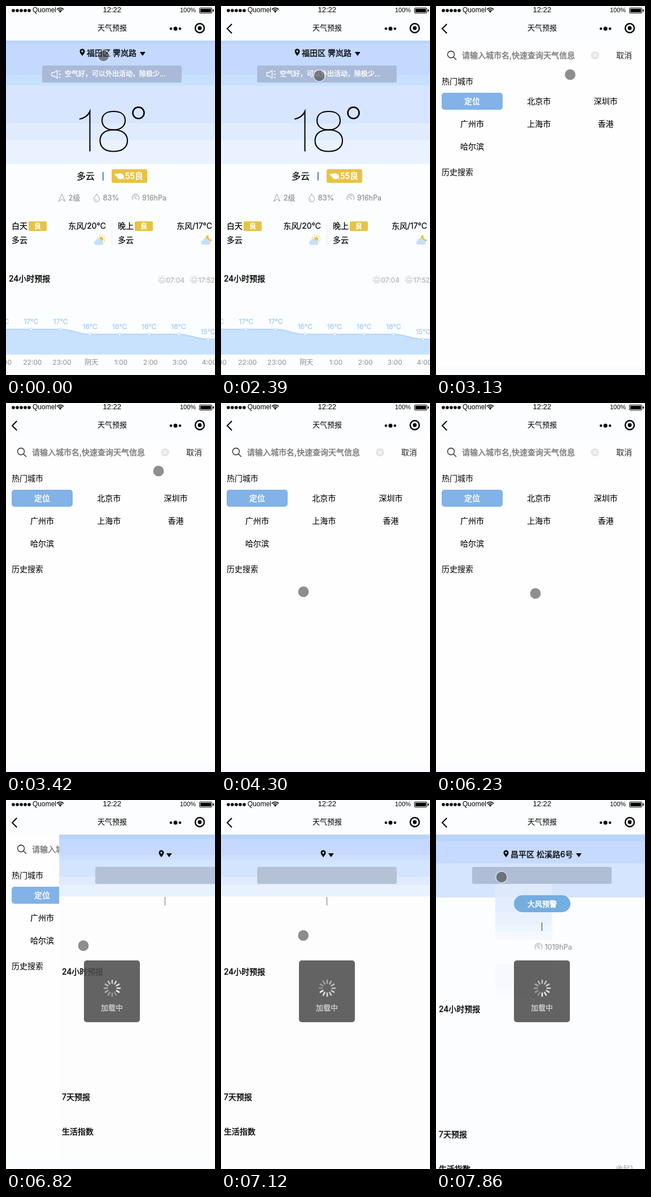
Animation of 370 by 651 pixels, one loop 8 s. Source, as an HTML page with a canvas:

```html
<!DOCTYPE html>
<html lang="zh-CN">
<head>
<meta charset="utf-8">
<title>天气预报</title>
<style>
html, body { margin: 0; width: 100%; height: 100%; overflow: hidden; background: #fcfdff; }
canvas { display: block; width: 370px; height: 651px; }
</style>
</head>
<body>
<canvas id="stage"></canvas>
<script>
const W = 370, H = 651, LOOP = 8000, TOP = 61;
const PAPER = '#fcfdff', INK = '#000', GRAY = '#999', PALE = '#b9b9b9', GOLD = '#e7c345', SKY = '#aed0f8';
const CJK = 'Inter, "Noto Sans CJK SC", "Noto Sans CJK", sans-serif';
const SANS = '"Liberation Sans", sans-serif';

const canvas = document.getElementById('stage');
const ctx = canvas.getContext('2d');
const ratio = window.devicePixelRatio || 1;
canvas.width = W * ratio;
canvas.height = H * ratio;

// y is the visual middle of the line; heft thickens the regular weight.
function text(str, x, y, { size = 14, color = INK, align = 'left', heft = 0, font = CJK } = {}) {
  ctx.font = `${size}px ${font}`;
  ctx.textAlign = align;
  ctx.fillStyle = color;
  ctx.fillText(str, x, y + size * 0.37);
  if (heft) {
    ctx.strokeStyle = color;
    ctx.lineWidth = heft;
    ctx.lineJoin = 'round';
    ctx.strokeText(str, x, y + size * 0.37);
  }
}

function rect(x, y, w, h, color, r = 0) {
  ctx.fillStyle = color;
  ctx.beginPath();
  ctx.roundRect(x, y, w, h, r);
  ctx.fill();
}

function dot(x, y, r, color = INK) {
  ctx.fillStyle = color;
  ctx.beginPath();
  ctx.arc(x, y, r, 0, 7);
  ctx.fill();
}

function ring(x, y, r, width, color = INK, from = 0, to = Math.PI * 2) {
  ctx.strokeStyle = color;
  ctx.lineWidth = width;
  ctx.lineCap = 'butt';
  ctx.beginPath();
  ctx.arc(x, y, r, from, to);
  ctx.stroke();
}

function stroke(d, color, width, cap = 'round') {
  ctx.strokeStyle = color;
  ctx.lineWidth = width;
  ctx.lineCap = cap;
  ctx.lineJoin = cap === 'round' ? 'round' : 'miter';
  ctx.stroke(new Path2D(d));
}

function fill(d, color) {
  ctx.fillStyle = color;
  ctx.fill(new Path2D(d));
}

function at(x, y, draw) {
  ctx.save();
  ctx.translate(x, y);
  draw();
  ctx.restore();
}

function rays(x, y, inner, outer, count, from, to, color, width) {
  for (let i = 0; i < count; i++) {
    const a = from + (to - from) * i / (count - 1);
    const c = Math.cos(a), s = Math.sin(a);
    stroke(`M${x + c * inner} ${y + s * inner}L${x + c * outer} ${y + s * outer}`, color, width);
  }
}

// Each band is [top, colour]; the last entry closes the sky.
function bands(list, x = 0, w = W) {
  for (let i = 0; i + 1 < list.length; i++)
    rect(x, list[i][0], w, list[i + 1][0] - list[i][0], list[i][1]);
}

function pin(x, y) {
  at(x, y, () => {
    fill('M0 6C-2 3-4.5 1-4.5-2A4.5 4.5 0 0 1 4.5-2C4.5 1 2 3 0 6Z', INK);
    dot(0, -2, 1.7, '#d5e4fd');
  });
}

function caret(x, y) {
  at(x, y, () => {
    fill('M-4-2.5H4L0 3Z', INK);
    stroke('M-4-2.5H4L0 3Z', INK, 1);
  });
}

function gauge(x, y) {
  ring(x, y, 6.3, 1, GRAY, 2.3, 7.1);
  ring(x, y, 3.8, 0.9, GRAY, 3.1, 5.9);
  stroke(`M${x - 1.5} ${y - 0.5}L${x + 1.5} ${y + 2.5}`, GRAY, 1.1);
}

function cloud(x, y) {
  at(x, y, () => fill('M-5 5.5A3.8 3.8 0 0 1-5.500-2A5 5 0 0 1 4-2.500A4.200 4.200 0 0 1 5.500 5.500Z', '#c3e0fd'));
}

function sunrise(x, y) {
  ring(x, y + 1, 3.6, 1, PALE, Math.PI, Math.PI * 2);
  rays(x, y + 1, 5.5, 7.5, 5, -2.85, -0.3, PALE, 1);
  stroke(`M${x - 7} ${y + 3}h14M${x - 4} ${y + 6}h8`, PALE, 1);
}

function bar(hasBack) {
  rect(0, 0, W, TOP, PAPER);
  for (let i = 0; i < 5; i++) dot(13 + i * 7, 8, 2.8);
  text('Quomel', 47, 6.7, { size: 12, font: SANS });
  ring(96, 11.5, 8, 1.7, INK, -2.4, -0.74);
  ring(96, 11.5, 5, 1.7, INK, -2.4, -0.74);
  fill('M96 12l-2.300-2.800a3.500 3.500 0 0 1 4.600 0Z', INK);
  text('12:22', 187.7, 6.5, { size: 13, font: SANS, align: 'center' });
  text('100%', 308, 6.7, { size: 11, font: SANS });
  ctx.strokeStyle = INK;
  ctx.lineWidth = 1;
  ctx.beginPath();
  ctx.roundRect(342.5, 3.5, 22, 9, 1.5);
  ctx.stroke();
  rect(344, 5, 19, 6, INK);
  rect(366, 6, 2, 4, INK, 1);

  text('天气预报', 188, 38, { size: 13, align: 'center' });
  dot(292, 40, 2.3);
  dot(300, 40, 3.5);
  dot(308, 40, 2.3);
  ring(343, 39, 8, 2.4);
  dot(343, 39, 3.4);
  if (hasBack) stroke('M18.500 32.500L11 40L18.500 47.500', INK, 2, 'square');
}

function temperature() {
  stroke('M130 199.500C138 198 145 194 148.500 186V256.500', INK, 2.1, 'butt');
  stroke('M190.500 186C204 186 211 192 211 202C211 212 203 218.500 190.500 218.500' +
    'C178 218.500 170 212 170 202C170 192 177 186 190.500 186Z', INK, 2.1);
  stroke('M190.500 218.500C206 218.500 215 226 215 237.500C215 249 206 256.500 190.500 256.500' +
    'C175 256.500 166.500 249 166.500 237.500C166.500 226 175 218.500 190.500 218.500Z', INK, 2.1);
  ring(234.5, 188.5, 10, 2.6);
}

function details() {
  const label = { size: 13, color: GRAY, heft: 0.3 };
  text('多云', 125, 300, { size: 16, heft: 0.2 });
  rect(171, 293, 1.5, 15, '#2c5f92');
  rect(187, 288, 63, 24, GOLD, 3);
  fill('M192 296C195 297 197 296.500 199 295.500C204 293.500 209 297 209 301.500C208 306 200 307 197 302.500C196 300 193 299 192 296Z', '#fff');
  stroke('M205 302L209.500 305.500', '#fff', 1.5);
  text('55良', 211, 300, { size: 14.5, color: '#fff', heft: 0.5 });

  stroke('M99 332L104.500 344.500L99 341L93.500 344.500Z', GRAY, 1);
  text('2级', 110.5, 338, label);
  stroke('M160.500 332C163 335.500 165.500 338 165.500 340.500A5 5 0 0 1 155.500 340.500C155.500 338 158 335.500 160.500 332Z', GRAY, 1);
  stroke('M158 340.500A2.500 2.500 0 0 0 160 343', GRAY, 0.8);
  text('83%', 171.5, 338, label);
  gauge(229.5, 338);
  text('916hPa', 241, 338, { ...label, size: 12.5 });
}

function halfDay(x, name, wind, right) {
  text(name, x, 388, { heft: 0.2 });
  rect(x + 30, 380, 32, 17, GOLD, 2);
  text('良', x + 46, 388.5, { size: 12, color: '#fff', align: 'center', heft: 0.6 });
  text(wind, right, 388, { align: 'right', heft: 0.2 });
  text('多云', x, 413, { heft: 0.2 });
}

function chart() {
  const gap = 52.2, x0 = -7.7;
  const temps = [17, 17, 17, 16, 16, 16, 16, 15, 15];
  const hours = ['21:00', '22:00', '23:00', '阴天', '1:00', '2:00', '3:00', '4:00'];
  const px = i => x0 + i * gap, py = i => 570.5 + (17 - temps[i]) * 8.7;
  const line = new Path2D();
  line.moveTo(px(0), py(0));
  for (let i = 1; i < temps.length; i++)
    line.bezierCurveTo(px(i - 0.6), py(i - 1), px(i - 0.4), py(i), px(i), py(i));
  const area = new Path2D(line);
  area.lineTo(px(8), 615);
  area.lineTo(px(0), 615);
  ctx.fillStyle = '#c8e2fe';
  ctx.fill(area);
  ctx.strokeStyle = '#b4d4fb';
  ctx.lineWidth = 2;
  ctx.stroke(line);
  hours.forEach((hour, i) => {
    dot(px(i), py(i), 2.3, '#fff');
    ring(px(i), py(i), 2.2, 1, '#b4d4fb');
    text(temps[i] + '°C', px(i), py(i) - 13.5, { size: 12, color: SKY, align: 'center', heft: 0.4 });
    text(hour, px(i) + 2.3, 629, { size: 12, color: GRAY, align: 'center', heft: 0.15 });
  });
}

function weatherPage() {
  rect(0, TOP, W, H - TOP, PAPER);
  bands([[61, '#bad5fb'], [66, '#c3d9fe'], [122, '#c6e1fd'], [140, '#d7e5fe'], [207, '#e0ecfe'], [237, '#e9f2fe'], [279]]);
  pin(135, 82);
  text('福田区 霁岚路', 143, 83, { heft: 0.3 });
  caret(242, 84);
  rect(64, 105, 247, 30, '#a9bad8', 3);
  stroke('M81 117.500h4l5.500-4v14l-5.500-4h-4Z', '#fff', 1.3);
  stroke('M93.500 116l2.500-1.500M94 120.500h3M93.500 125l2.500 1.500', '#fff', 1.3);
  text('空气好，可以外出活动，除极少...', 104, 120, { size: 12, color: '#fff', heft: 0.4 });
  temperature();
  details();

  halfDay(10, '白天', '东风/20°C', 177);
  halfDay(198, '晚上', '东风/17°C', 365);
  rect(187, 383, 1, 40, '#e5ebf2');
  dot(168.5, 411, 3.8, '#eebf3e');
  rays(168.5, 411, 6, 7.5, 8, -3.3, 1.2, '#eebf3e', 1.2);
  cloud(164.5, 416);
  fill('M359 404A6 6 0 1 0 365 412A5.500 5.500 0 0 1 359 404Z', '#eebf3e');
  cloud(354, 415.5);

  text('24小时预报', 5, 481, { heft: 0.4 });
  sunrise(276, 482);
  text('07:04', 283.5, 484, { size: 12, color: PALE, heft: 0.3 });
  sunrise(333, 482);
  text('17:52', 340.5, 484, { size: 12, color: PALE, heft: 0.3 });
  chart();
}

function searchPage() {
  rect(0, TOP, W, 574, '#fefefe');
  rect(0, 635, W, 16, '#fafcff');
  ring(26.5, 85.5, 6, 1.3, '#222');
  stroke('M31 90L35.500 94.500', '#222', 1.4);
  text('请输入城市名,快速查询天气信息', 46, 87, { color: '#7c7c7c', heft: 0.5 });
  dot(281.5, 87, 7.3, '#e5e5e5');
  stroke('M279 84.500l5 5M284 84.500l-5 5', '#fff', 1.5);
  text('取消', 319, 87, { color: '#222' });
  text('热门城市', 10, 133);
  rect(10, 153, 108, 30, '#82b2e7', 5);
  const cities = ['定位', '北京市', '深圳市', '广州市', '上海市', '香港', '哈尔滨'];
  cities.forEach((city, i) => {
    const style = i ? { heft: 0.1 } : { color: '#fff', heft: 0.5 };
    text(city, 64 + (i % 3) * 118.3, 168 + Math.floor(i / 3) * 40, { ...style, align: 'center' });
  });
  text('历史搜索', 10, 293);
}

function loadingPage(loaded, patched) {
  const shift = loaded ? 66 : 0;
  rect(0, TOP, W, H - TOP, loaded ? PAPER : '#fdfdfe');
  if (loaded) {
    bands([[61, '#bad4fa'], [73, '#c5dafe'], [112, '#d6e5fe'], [172]]);
    if (patched) {
      bands([[148, '#dee9fc'], [172, '#e4edfe'], [197, '#e9f1fe'], [220, '#eef5fe'], [232, '#f5f9ff'], [247]], 105, 100);
      bands([[290, '#f7f9fe'], [330, '#fafbfe'], [347]], 105, 100);
    }
    pin(124, 95);
    text('昌平区 松溪路6号', 132, 96, { heft: 0.3 });
    caret(253, 97);
  } else {
    bands([[61, '#bad4fa'], [69, '#c4d9fd'], [97, '#cce0fd'], [105, '#d2e4fe'], [135, '#dfebfd'], [150, '#e8f2fe'], [170]]);
    pin(181, 95);
    caret(195, 97);
  }
  rect(64, 118, 247, 30, loaded ? '#afbdd5' : '#b5c2d5', 3);
  if (loaded) {
    rect(138, 168, 100, 30, '#74ade0', 15);
    text('大风预警', 188, 183, { size: 13, color: '#fff', align: 'center', heft: 0.6 });
    rect(187, 216, 1, 15, '#1c3a30');
    gauge(181.5, 259);
    text('1019hPa', 192.5, 259, { size: 12.5, color: GRAY, heft: 0.2 });
    text('收起》', 319, 651, { size: 12, color: GRAY });
  } else {
    rect(187, 171, 1, 15, '#7a6290');
  }
  text('24小时预报', 5, 303 + shift, { heft: 0.4 });
  text('7天预报', 5, 524 + shift, { heft: 0.4 });
  text('生活指数', 5, 585 + shift, { heft: 0.4 });
}

function toast(step) {
  rect(138, 283, 99, 109, 'rgba(78,78,78,.88)', 5);
  for (let i = 0; i < 12; i++) {
    const a = i * Math.PI / 6, c = Math.cos(a), s = Math.sin(a);
    const glow = 0.3 + 0.6 * ((i + 82 - step * 2) % 12) / 11;
    stroke(`M${188 + c * 8.8} ${332 + s * 8.8}L${188 + c * 14} ${332 + s * 14}`, `rgba(255,255,255,${glow})`, 2.6);
  }
  text('加载中', 187.5, 365.7, { size: 13, color: '#d2d2d2', align: 'center', heft: 0.3 });
}

// Pointer route as [step, x, y].
const route = [
  [0, 174, 123], [3, 205, 122], [7, 270, 120], [8, 266, 140], [10, 225, 260], [12, 168, 375],
  [13, 146, 333], [14, 150, 255], [15, 194, 187], [18, 186, 173], [20, 186, 173], [21, 200, 200],
  [23, 227, 330], [24, 205, 387], [25, 185, 365], [26, 176, 336], [28, 109, 290], [30, 137, 257],
  [33, 150, 230], [36, 125, 160], [37, 116, 136]
];

function pointer(step) {
  if (step < 0) return [172.5, 88];
  const i = route.findIndex(p => p[0] >= step);
  if (i < 1) return route[i < 0 ? route.length - 1 : 0].slice(1);
  const [s0, x0, y0] = route[i - 1], [s1, x1, y1] = route[i];
  const k = (step - s0) / (s1 - s0);
  return [x0 + (x1 - x0) * k, y0 + (y1 - y0) * k];
}

// The screen refreshes in steps of about 148 ms once the pointer starts to move.
function draw(t) {
  const step = Math.floor((t - 2375) / 147.8);
  ctx.setTransform(ratio, 0, 0, ratio, 0, 0);
  if (step < 2) weatherPage();
  if (step === 1) at(94, 0, searchPage);
  if (step >= 2 && step < 31) searchPage();
  if (step >= 30) {
    at(step === 30 ? 94 : 0, 0, () => loadingPage(step >= 34, step >= 37));
    if (step === 30) rect(0, 635, W, 16, '#fafcff');
    toast(step);
  }
  bar(t >= 300);
  const [x, y] = pointer(step);
  dot(x, y, 9.5, 'rgba(60,60,60,.58)');
  ring(x, y, 10.2, 1.5, 'rgba(255,255,255,.5)');
}

function tick() {
  draw(performance.now() % LOOP);
  requestAnimationFrame(tick);
}
tick();
</script>
</body>
</html>
```
